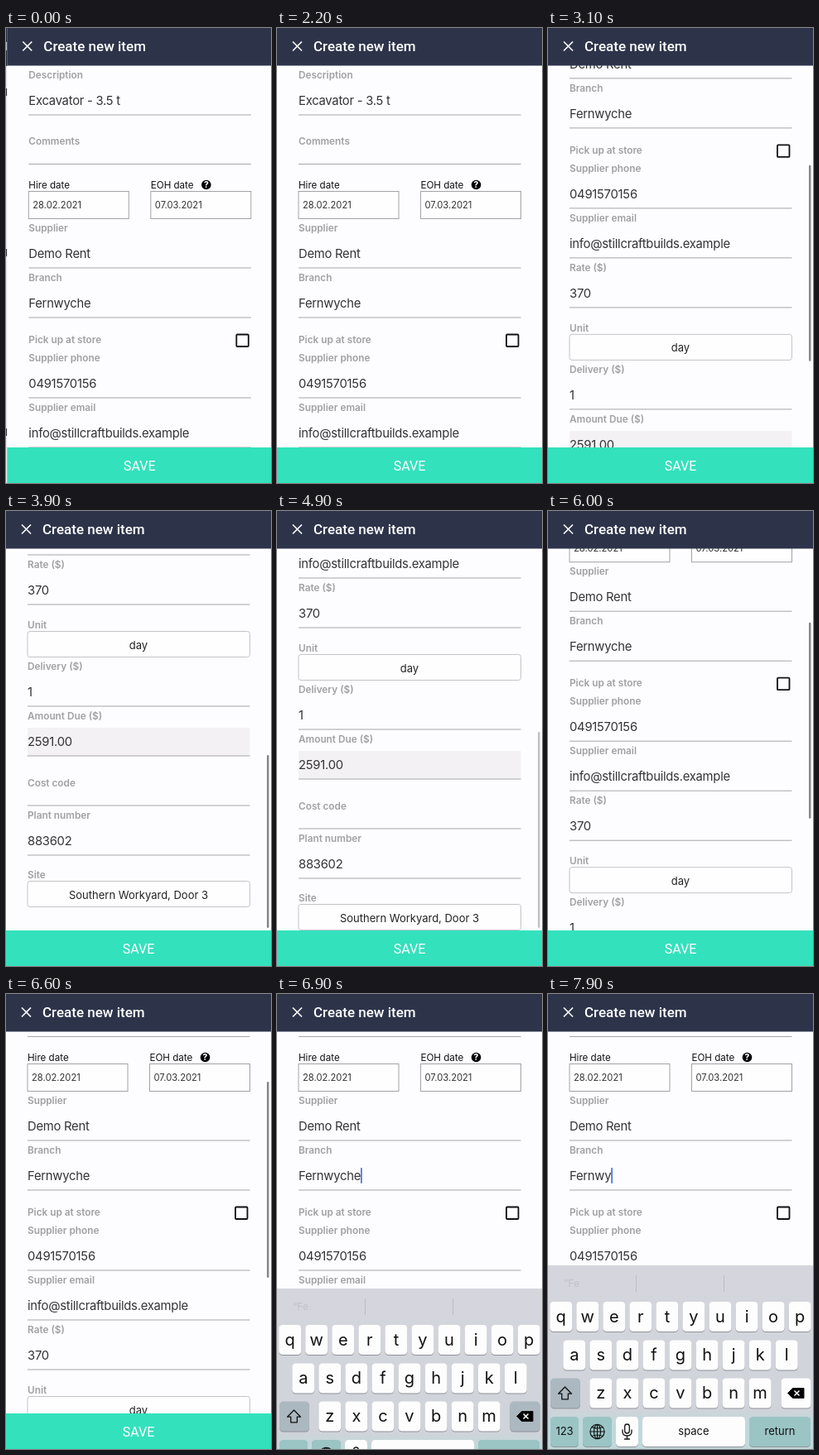
These frames come from a looping animation (320 px wide and 550 px high, 8 s). An HTML page:

```html
<!DOCTYPE html>
<html lang="en">
<head>
<meta charset="utf-8">
<title>Create new item</title>
<style>
  html, body { margin: 0; width: 100%; height: 100%; overflow: hidden; background: #fdfcfe; }
  svg { display: block; width: 320px; height: 550px; font-family: Inter, "Open Sans", sans-serif; }
  .label { font-size: 11.8px; font-weight: 600; fill: #a09fa3; }
  .value { font-size: 14.8px; letter-spacing: -.25px; fill: #333336; }
  .caption { font-size: 11.6px; fill: #111; }
  .date { font-size: 11.2px; fill: #333; }
  .choice { font-size: 13px; fill: #222; text-anchor: middle; }
  .bar { font-family: Roboto, sans-serif; fill: #fff; }
  .key { font-size: 20px; fill: #111; text-anchor: middle; }
  .small { font-size: 13px; }
  .line { fill: #a6a5a9; }
  .box { fill: #fefefe; stroke: #a3a2a6; }
  .icon { fill: none; stroke: #111; stroke-width: 1.3; stroke-linejoin: round; stroke-linecap: round; }
</style>
</head>
<body>
<svg id="stage" viewBox="0 0 320 550"></svg>
<script>
const LOOP = 8000, MAX_SCROLL = 426, BRANCH = 'Fernwyche';
const $ = id => document.getElementById(id);
const clamp = v => Math.min(1, Math.max(0, v));
const ramp = (t, from, to) => clamp((t - from) / (to - from));
const smooth = p => p * p * (3 - 2 * p);

// Form parts; y is the vertical middle of the capitals.
const text = (cls, x, y, str, id = '') => `<text class="${cls}" x="${x}" y="${y}" id="${id}">${str}</text>`;
const label = (y, str) => text('label', 26, y + 4.2, str);
const value = (y, str, id) => text('value', 26, y + 5.3, str, id);
const rule = y => `<rect class="line" x="26" y="${y - .5}" width="268.5" height="1"/>`;
const field = (y, name, str, id) => label(y, name) + value(y + 31, str, id) + rule(y + 48);
const rect = (x, y, w, h, fill, r = 0, extra = '') =>
  `<rect x="${x}" y="${y}" width="${w}" height="${h}" rx="${r}" fill="${fill}" ${extra}/>`;
const dateBox = (x, name, str) => text('caption', x, 194, name) +
  `<rect class="box" x="${x}" y="197.5" width="121" height="33"/>` + text('date', x + 5, 217.8, str);
const select = (y, name, str) => label(y, name) +
  `<rect class="box" x="26" y="${y + 7.5}" width="268.5" height="31" rx="3" style="stroke:#c4c3c8"/>` +
  text('choice', 160, y + 28.5, str);

const form = [
  field(57, 'Description', 'Excavator - 3.5 t'),
  label(137, 'Comments'), rule(164.5),
  dateBox(26, 'Hire date', '28.02.2021'),
  dateBox(173.5, 'EOH date', '07.03.2021'),
  '<circle cx="240.5" cy="189.5" r="5.8"/>',
  '<text x="240.5" y="193.2" font-size="10" font-weight="800" fill="#fff" text-anchor="middle">?</text>',
  field(242, 'Supplier', 'Demo Rent'),
  field(302, 'Branch', BRANCH, 'branch'),
  rect(0, 323, 1.7, 19, '#3f74d6', .8, 'id="caret"'),
  label(377, 'Pick up at store'),
  rect(277, 370.5, 14.5, 14.5, 'none', 1, 'stroke="#111" stroke-width="1.8"'),
  field(399, 'Supplier phone', '0491570156'),
  field(459, 'Supplier email', 'info@stillcraftbuilds.example'),
  field(519, 'Rate ($)', '370'),
  select(592, 'Unit', 'day'),
  field(642, 'Delivery ($)', '1'),
  rect(26, 716, 268.5, 34, '#f3f1f4'),
  field(702, 'Amount Due ($)', '2591.00'),
  label(783, 'Cost code'), rule(810),
  field(822, 'Plant number', '883602'),
  select(894, 'Site', 'Southern Workyard, Door 3')
].join('');

// Keyboard, laid out at its resting place.
const key = (x, y, w, fill = '#fdfdfe', id = '') =>
  rect(x, y + 1, w, 36, '#8f9299', 4.5) + rect(x, y, w, 36, fill, 4.5, `id="${id}"`);
const letters = (row, firstX, y) => [...row].map((ch, i) => {
  const x = firstX + 32.05 * i;
  return key(x - 13.5, y, 27) + text('key', x, y + 24.5, ch);
}).join('');
const wordKey = (x, w, fill, word) => key(x, 511, w, fill) + text('key small', x + w / 2, 533, word);
const TEAL = '#9bc4c5';

const keyboard = [
  rect(0, 328, 320, 222, 'url(#tray)'),
  rect(106, 340, 1, 20, '#bbbdc4'), rect(212, 340, 1, 20, '#bbbdc4'),
  '<text x="19" y="354" font-size="12" fill="#bfc1c8">“Fe</text>',
  letters('qwertyuiop', 15.7, 372),
  letters('asdfghjkl', 31.8, 418.5),
  letters('zxcvbnm', 63.8, 464.5),
  key(3, 464.5, 36, '#abb8bf'),
  '<path class="icon" d="M20.5 475l8 8.2h-4.2v6.6h-7.6v-6.6h-4.2z"/>',
  key(281.5, 464.5, 36, '#abb8bf', 'erase'),
  '<path d="M289.500 482.500l6-6h13.500v12h-13.500z" stroke="#111" stroke-linejoin="round"/>',
  '<path d="M297.500 479.500l6 6m0-6l-6 6" stroke="#fff" stroke-width="1.5"/>',
  wordKey(3, 34, TEAL, '123'),
  key(42, 511, 35, TEAL),
  '<g class="icon" style="stroke-width:1.1"><circle cx="59.5" cy="529" r="8.6"/><ellipse cx="59.5" cy="529" rx="4" ry="8.6"/><path d="M51 529h17M59.500 520.500v17M53 523.500q6.500 3 13 0M53 534.500q6.500-3 13 0"/></g>',
  key(82, 511, 27),
  '<g class="icon"><rect x="92.700" y="520" width="5.600" height="11" rx="2.800"/><path d="M90 527v2q0 5 5.500 5t5.500-5v-2M95.500 534v4M92.500 538h6"/></g>',
  wordKey(114, 124, '#fdfdfe', 'space'),
  wordKey(243, 74, TEAL, 'return')
].join('');

$('stage').innerHTML = `
  <defs><linearGradient id="tray" x1="0" y1="0" x2="0" y2="1">
    <stop offset="0" stop-color="#d5d6dd"/><stop offset=".78" stop-color="#d0d3da"/>
    <stop offset=".86" stop-color="#c2d8db"/><stop offset="1" stop-color="#c0d9db"/>
  </linearGradient></defs>
  ${rect(0, 0, 320, 550, '#e6e5e9')}${rect(0, 0, 320, 46, '#262c3f')}
  ${rect(0, 17, 1, 10, '#b9bcc6')}${[73, 267, 484].map(y => rect(0, y, 1.2, 9, '#333')).join('')}
  <g id="screen">
    ${rect(0, 0, 320, 550, '#fdfcfe')}
    <g id="form">${form}</g>
    ${rect(315, 0, 2.5, 237, '#88878c', 1.25, 'id="thumb"')}
    ${rect(0, 0, 320, 45.5, '#2d344a')}
    <path d="M19 16.500l11 11m0-11l-11 11" stroke="#fff" stroke-width="1.700"/>
    <text class="bar" x="44" y="28" font-size="17" font-weight="500">Create new item</text>
    ${rect(0, 507, 320, 43, '#33e1bd')}
    <text class="bar" x="160" y="534.7" font-size="16" text-anchor="middle">SAVE</text>
    <g id="keyboard">${keyboard}</g>
  </g>`;

function scrollAt(t) {
  if (t < 3900) return 454 * smooth(ramp(t, 2290, 3900));
  if (t < 4900) return 454 - 28 * (1 - (1 - ramp(t, 3900, 4300)) ** 2);
  return MAX_SCROLL - 313 * smooth(ramp(t, 4900, 6405));
}

function thumbOpacity(t) {
  return t < 4800 ? ramp(t, 2300, 2450) - ramp(t, 4400, 4700)
                  : ramp(t, 4850, 4950) - ramp(t, 6650, 6900);
}

const move = (id, x, y) => $(id).setAttribute('transform', `translate(${x} ${y})`);

function draw(t) {
  const scroll = scrollAt(t), over = Math.max(0, scroll - MAX_SCROLL);
  move('screen', 1.3 * (1 - ramp(t, 0, 400)) ** 2, 0);
  move('form', 0, -scroll);

  // The thumb shrinks against the lower end while overscrolled.
  $('thumb').setAttribute('y', 48 + .514 * (scroll - over) + over);
  $('thumb').setAttribute('height', 237 - over);
  $('thumb').setAttribute('opacity', thumbOpacity(t));

  const erased = t < 7500 ? 0 : Math.min(3, 1 + Math.floor((t - 7500) / 200));
  $('branch').textContent = BRANCH.slice(0, BRANCH.length - erased);
  $('caret').setAttribute('x', 26 + $('branch').getComputedTextLength());
  $('caret').setAttribute('opacity', t >= 6700 ? 1 : 0);

  move('keyboard', 0, 224 * (1 - ramp(t, 6700, 7100)) ** 3);
  $('erase').setAttribute('fill', t >= 7500 ? '#fdfdfe' : '#abb8bf');
}

function tick() {
  draw(Math.floor(performance.now() % LOOP / 100) * 100);
  requestAnimationFrame(tick);
}
tick();
</script>
</body>
</html>
```
